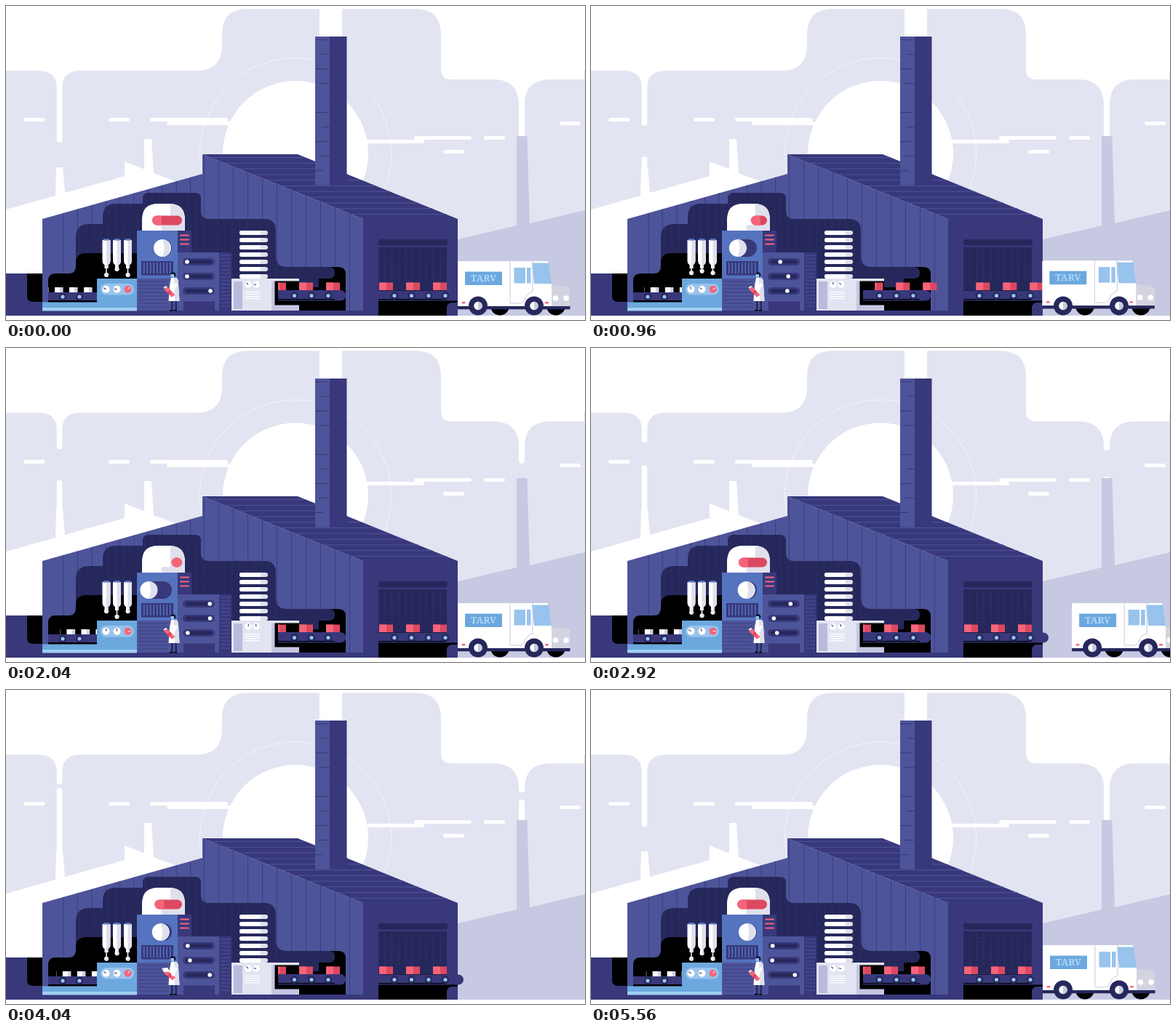
An HTML page for the animation above (5.6 s loop, 796x432 px).

```html
<!DOCTYPE html>
<html lang="en">
<head>
<meta charset="utf-8">
<title>Factory</title>
<style>
html,body{margin:0;width:100%;height:100%;overflow:hidden;background:#fff}
svg{display:block;width:796px;height:432px}
</style>
</head>
<body>
<svg id="stage" viewBox="0 0 796 432" xmlns="http://www.w3.org/2000/svg"></svg>
<script>
const LOOP = 5600;
const C = {
  sky: '#e3e4f2', haze: '#c7c9e2', wall: '#4d5499', navy: '#38387b', deep: '#26285c',
  blue: '#5573be', aqua: '#6ca8de', pale: '#98c3ec', red: '#f5647a', rose: '#dc4860', grey: '#dfe0ec'
};

const rect = (x, y, w, h, fill, r = 0, more = '') =>
  `<rect x="${x}" y="${y}" width="${w}" height="${h}" rx="${r}" fill="${fill}" ${more}/>`;
const path = (d, fill, more = '') => `<path d="${d}" fill="${fill}" ${more}/>`;
const disc = (x, y, r, fill, more = '') => `<circle cx="${x}" cy="${y}" r="${r}" fill="${fill}" ${more}/>`;
const line = (x1, y1, x2, y2, stroke, w = 1, more = '') =>
  `<line x1="${x1}" y1="${y1}" x2="${x2}" y2="${y2}" stroke="${stroke}" stroke-width="${w}" ${more}/>`;
const rep = (n, fn) => Array.from({length: n}, (_, i) => fn(i)).join('');
const group = (id, body, more = '') => `<g id="${id}" ${more}>${body}</g>`;
const clip = (id, body) => `<clipPath id="${id}">${body}</clipPath>`;

const ROOM = 'M96 352V318Q96 300 114 300H133V290Q133 272 151 272H188V265Q188 257 196 257H260Q268 257 268 265V282' +
  'Q268 293 279 293H355Q371 293 371 309V344Q371 359 386 359H444Q452 359 452 367T444 375H430V387H403V400H96Z';
const FRONT = 'M50 293L270 231V204L491 293V419H50Z';

const wheel = (x, y) => disc(x, y, 5.2, C.deep) + disc(x, y, 2.6, C.pale);
const redBox = x => rect(x, 380.5, 19, 10.5, C.rose) + rect(x, 380.5, 10, 10.5, C.red);
const whiteBox = x => rect(x, 387, 11.5, 7, '#cfd0e4') + rect(x, 387, 7, 7, '#fff');
const smoke = (id, x, w) =>
  line(x, 0, x, 0, '#fff', w, `id="${id}Top" stroke-linecap="round"`) +
  line(x, 0, x, 0, '#fff', w, `id="${id}Low" stroke-linecap="round"`);

function defs() {
  return '<defs>' +
    clip('front', path(FRONT, '#000')) +
    clip('room', path(ROOM, '#000')) +
    clip('dome', path('M187 309V294Q187 272 209 272H224Q246 272 246 294V309Z', '#000')) +
    clip('inBelt', rect(58, 380, 67, 20, '#000')) +
    clip('midBelt', rect(374, 370, 93, 30, '#000')) +
    clip('outBelt', rect(512, 370, 150, 30, '#000')) +
    clip('above', rect(0, 0, 796, 426, '#000')) +
    '</defs>';
}

function sky() {
  const dashes = [[24, 154, 29.5], [141, 154, 29], [198, 154, 107], [221, 159, 90], [561, 179, 79],
    [490, 184, 85], [657, 179, 29], [601, 198, 29], [761, 159, 29]];
  return path('M0 89H45Q70 89 70 114H77Q77 89 102 89H262Q297 89 297 54V39Q297 4 332 4H431V60H462V4H563' +
    'Q598 4 598 39V87Q598 101 612 101H670Q705 101 705 136H713Q713 101 748 101H796V330H0Z', C.sky) +
    rect(795, 89, 1, 12, C.sky) +
    disc(398, 203, 100, '#fff') +
    disc(398, 203, 131.5, 'none', 'stroke="#fff" stroke-dasharray="3 2"') +
    dashes.map(([x, y, w]) => rect(x, y, w, 5, '#fff', 2.5)).join('') +
    smoke('left', 73.5, 7.5) + smoke('right', 709, 8) +
    path('M0 280L68 261L69 222H78L81 257L163 234V214L190 224.500V183H200L203 230L232 241L240 300V368H0Z', '#fff') +
    path('M702 179H716.500L720 299L796 281V426H600V326L702 302Z', C.haze);
}

function shell() {
  const ticks = [[46, 0, 17], [66, 9, 11], [86, 0, 17], [106, 6, 14], [126, 17, 3],
    [146, 0, 17], [166, 9, 11], [186, 0, 17], [206, 5, 15], [226, 0, 12]];
  return rect(0, 368, 50, 58, C.navy) +
    path('M29 368H50V407H37Q29 407 29 399Z', '#000') +
    path(FRONT, C.wall) +
    group('seams', rep(10, i => line(79 + 19.4 * i, 200, 79 + 19.4 * i, 419, C.navy, .8)) +
      rep(11, i => line(272.5 + 20 * i, 200, 272.5 + 20 * i, 419, C.navy, .8)), 'clip-path="url(#front)"') +
    path('M270 204H401L621 293V426H491V293Z', C.navy) +
    rep(11, i => {
      const dy = 4.5 + 7.8 * i, dx = dy * 2.48;
      return line(270 + dx, 204 + dy, 401 + dx, 204 + dy, C.wall, 1);
    }) +
    rect(425, 42, 20, 204.500, C.wall) + rect(445, 42, 23.500, 204.500, C.navy) +
    ticks.map(([y, x, w]) => rect(425 + x, y, w, 1, C.navy)).join('') +
    rect(0, 419, 621, 7, C.navy);
}

function cutaway() {
  return path('M370 359H457Q467 359 467 369V419H370Z', '#000') +
    path(ROOM, C.deep) +
    group('dots', rep(28, i => line(101 + 10 * i, 255, 101 + 10 * i, 375, '#34376f', .8)),
      'clip-path="url(#room)" stroke-dasharray="3 2"') +
    path('M58 378Q58 368 68 368H86Q96 368 96 358V354Q96 340 110 340H182V419H58Z', '#000');
}

function leftMachines() {
  const tube = (x, i) =>
    group('rod' + i, line(x, 340, x, 370, '#fff', 1.5) + disc(x, 370, 3, '#fff') +
      path(`M${x} 367a3 3 0 0 1 0 6Z`, C.grey)) +
    path(`M${x - 5.5} 322h11v28q0 5-3 6v5h-5v-5q-3-1-3-6Z`, '#fff') +
    path(`M${x} 322h5.500v28q0 5-3 6v5h-2.500Z`, C.grey) +
    rect(x - 4, 320, 8, 2.5, C.blue);
  const gauge = (x, y, r, fill, id, ink) => disc(x, y, r, fill) +
    line(x, y, x, y - r + 1.2, ink, 1, `id="${id}"`);
  return group('inBoxes', '', 'clip-path="url(#inBelt)"') +
    rect(58, 394, 67, 13, C.navy) + rect(58, 405, 67, 2, '#000') +
    wheel(78, 400) + wheel(101, 400) +
    [138, 152.5, 167.5].map(tube).join('') +
    rect(50, 407.5, 130, 8, C.aqua) + rect(125, 375, 55, 41, C.aqua) +
    rect(50, 415, 130, 4.5, '#a0cff3') + rect(130, 382, 46, 15.5, C.pale, 7.7) +
    gauge(137.5, 389.7, 5, '#fff', 'g0', C.deep) +
    gauge(152.5, 389.7, 5, '#fff', 'g1', C.deep) +
    gauge(167.5, 389.7, 5, C.red, 'g2', '#fff') +
    // oven
    rect(180, 309, 56, 110, C.wall) + rect(180, 309, 56, 66, C.blue) +
    rep(8, i => line(182, 379 + 5 * i, 222, 379 + 5 * i, C.navy, .8)) +
    rect(236, 309, 19, 30, C.navy) +
    rep(3, i => rect(239, 314.5 + 6 * i, 13, 2, C.red, 1)) +
    rect(186, 351, 44, 19.500, C.navy) +
    rep(9, i => rect(189 + 4.5 * i, 353, 1.5, 15, C.blue)) +
    group('cap', rect(187, 272, 59, 37, '#fff') +
      path('M226 272H246V309H217Q213 309 213 305T217 301H226Z', C.grey), 'clip-path="url(#dome)"') +
    rect(201, 288.5, 41, 13, C.rose, 6.5, 'id="bar"') +
    path('', C.red, 'id="barTip"') +
    rect(203, 321, 25, 24, C.navy, 12, 'id="slot"') +
    group('knob', disc(0, 333, 12, '#fff') + path('M0 321a12 12 0 0 1 0 24q5-12 0-24Z', C.grey)) +
    // slider cabinet
    rect(236, 339, 57, 80, C.wall) + rect(293, 339, 17, 80, C.navy) +
    rep(15, i => line(295, 343 + 5 * i, 308, 343 + 5 * i, C.wall, 1)) +
    rect(244, 406.5, 43, 12.5, C.navy) +
    rep(3, i => rect(243, 347 + 20 * i, 44, 10, C.navy, 5) + rect(247, 349.5 + 20 * i, 36, 5, C.deep, 2.5) +
      disc(0, 352 + 20 * i, 2.8, '#fff', `id="s${i}"`)) +
    // stacked plates and packer
    rep(7, i => rect(321, 309 + 10 * i, 39, 6, C.grey, 3) + path(`M350 ${309 + 10 * i}h-26a3 3 0 0 0 0 6h26Z`, '#fff')) +
    rect(310, 375, 93, 44, '#c5c7e2') + rect(310, 375, 55, 44, C.sky) +
    rect(365, 375, 38, 3.5, C.sky) + rect(313, 379, 12, 38, '#b9bbdd') +
    rep(4, i => rect(328, 393 + 3 * i, 21, 1.2, '#fff')) +
    rect(369.5, 378.5, 33.500, 33, '#000') +
    gauge(333, 383.2, 4.6, '#fff', 'g3', C.deep) +
    gauge(344, 383.2, 4.6, '#fff', 'g4', C.deep);
}

function worker() {
  return rect(227, 404, 2.5, 15, C.deep) + rect(232.5, 404, 2.5, 15, C.deep) +
    path('M225 419.500v-1.500h4.500v1.500ZM231 419.500v-1.500h4v1.500Z', '#000') +
    path('M227 374H234Q237 375 237 382L238.500 406H223.500L225 384Z', '#fff') +
    path('M231 374H234Q237 375 237 382L238.500 406H232Z', C.grey) +
    disc(229.5, 370.5, 3.2, C.pale) +
    path('M225.500 369Q227 366 230 366Q234 367 233.500 371L231 373V369Z', '#15163a') +
    group('board', path('M-8 -1L-4 -5L8 5L4 9Z', C.red) + path('M0 -1L3.500 1.500L0 5.500L-3 3Z', C.rose) +
      path('M-7 -2L-4 -5L-6 -6L-9 -3Z', '#fff')) +
    path('M217 387.500L214 383L222 382L226 388Z', '#fff', 'id="sheet"') +
    path('M233 381L236 383L230 394L227 392Z', '#fff');
}

function belts() {
  return group('midBoxes', '', 'clip-path="url(#midBelt)"') +
    path('M374 391H460a7 7 0 0 1 0 14.500H374Z', C.navy) + rect(374, 403, 78, 1.2, '#000') +
    [396.5, 420, 443].map(x => wheel(x, 398.5)).join('') +
    // loading door
    rect(512, 321, 95, 8.5, C.deep, 3) + rect(512, 332, 94, 60, C.deep) +
    rep(9, i => line(521 + 9.5 * i, 335, 521 + 9.5 * i, 380, '#3a3c78', .8, 'stroke-dasharray="3 2"')) +
    rect(512, 391, 94, 35, '#000') + rect(606, 404, 15, 22, '#000') +
    path('M606 426V416Q606 408 614 408H621V426Z', C.navy) +
    group('outBoxes', '', 'clip-path="url(#outBelt)"') +
    path('M512 391.500H622a6.800 6.800 0 0 1 0 14H512Z', C.navy) + rect(512, 403, 94, 1.2, '#000') +
    [534, 557.5, 581, 604].map(x => wheel(x, 398.5)).join('');
}

function truck() {
  const tyre = x => disc(x, 412.5, 13, C.deep) + disc(x, 412.5, 5.7, '#fff') +
    path(`M${x} 406.800a5.700 5.700 0 0 1 0 11.400Z`, '#c9cbda');
  const body = path('M621 353Q621 351 623 351H745L750 384L775 389V414H621Z', '#fff') +
    path('M750 384L770 386Q775 387 775 392V413H750Z', '#d3d4e0') +
    path('M723 353.500H746L750 382H726Z', C.pale) +
    rect(698.5, 360, 15.5, 21.500, C.pale) + rect(716, 360, 5.5, 21.500, C.pale) +
    path('M693 351V409H707Q711 409 713 404Q716 395 724 393V351', 'none', 'stroke="#c9cbe0"') +
    rect(631, 365.5, 51, 18.500, C.aqua) +
    `<text x="656.5" y="379" text-anchor="middle" font-family="'Noto Serif',serif" font-weight="800" font-size="13" fill="#b3d8f6">TARV</text>` +
    disc(755.5, 402, 3.8, '#fff') + disc(770, 402, 3.8, '#fff') +
    rect(626.5, 407, 5, 2.4, C.red, 1.2) + rect(741, 407, 5, 2.4, C.red, 1.2) +
    rect(621, 413, 154.500, 4.3, C.deep);
  return group('truck', disc(679, 412.5, 13, '#000') + disc(756, 412.5, 13, '#000') +
    group('body', body) + tyre(649) + tyre(726), 'clip-path="url(#above)"');
}

const svg = document.getElementById('stage');
svg.innerHTML = defs() + sky() + shell() + cutaway() + leftMachines() + worker() + belts() + truck();

const parts = {};
svg.querySelectorAll('[id]').forEach(el => parts[el.id] = el);
const set = (id, attrs) => { for (const k in attrs) parts[id].setAttribute(k, attrs[k]); };
const shift = (id, x, y) => set(id, {transform: `translate(${x} ${y})`});
const turn = (id, a) => set(id, {
  transform: `rotate(${a} ${parts[id].getAttribute('x1')} ${parts[id].getAttribute('y1')})`
});
const wave = (t, period) => Math.cos(2 * Math.PI * t / period);

parts.inBoxes.innerHTML = rep(6, i => whiteBox(27 + 20 * i));
parts.midBoxes.innerHTML = rep(5, i => redBox(329 + 37 * i));
parts.outBoxes.innerHTML = rep(4, i => redBox(476 + 37 * i));

// A plume rises off its stack, then a fresh one grows up to meet it.
function plume(id, t, base, min, detach, delay, r) {
  const speed = .0235, u = (t - detach + LOOP) % LOOP;
  const end = Math.max(min, base - speed * u);
  const top = base - speed * (u - delay);
  set(id + 'Top', {y1: min - 20, y2: end - r});
  set(id + 'Low', {y1: top + r, y2: base + 4, visibility: u > delay ? 'visible' : 'hidden'});
}

function truckX(t) {
  if (t < 2360) return 0;
  if (t < 3800) return 40 * ((t - 2360) / 560) ** 2;
  return t < 4850 ? 13 * ((4850 - t) / 210) ** 2 : 0;
}

function draw(t) {
  const fast = wave(t, 800), slow = wave(t, 1400);
  plume('left', t, 222, 130, 4130, 1790, 3.75);
  plume('right', t, 179, 141, 1190, 1660, 4);

  shift('inBoxes', t / 350 % 1 * 20, 0);
  const loading = t < 2000;
  const step = loading ? t * 111 / 2000 % 37 : 0;
  shift('midBoxes', step, 0);
  shift('outBoxes', step, 0);

  [1, -1, 1].forEach((s, i) => shift('rod' + i, 0, -4 + 4 * s * fast));
  [-fast, -slow, fast].forEach((v, i) => set('s' + i, {cx: 265 + 16 * v}));

  const x = 214.5 - 13.5 * slow, tip = Math.min(x + 13, 235.5);
  set('bar', {x, width: 242 - x});
  set('barTip', {d: `M${x + 6.5} 288.5H${tip}${tip < 235.5 ? 'v13' : 'a6.5 6.5 0 0 1 0 13'}H${x + 6.5}a6.5 6.5 0 0 1 0-13Z`});
  const k = 205.5 + 9.5 * slow;
  shift('knob', k, 0);
  set('slot', {x: k - 12, width: 240 - k});

  turn('g0', -25 - 35 * slow);
  turn('g1', -45 - 40 * fast);
  turn('g2', 70 - 30 * fast);
  turn('g3', -20 - 30 * slow);
  turn('g4', -45 - 40 * fast);

  const lift = Math.max(0, 1 - Math.abs(t - 4040) / 400);
  set('board', {transform: `translate(225 ${391.5 - lift}) rotate(${6 - 6 * lift})`});
  set('sheet', {opacity: lift > .3 ? 1 : 0});

  const hop = loading ? Math.sin(Math.PI * t / 667) ** 2 : 0;
  shift('truck', truckX(t), 0);
  shift('body', -.7 * hop, -.9 * hop);
}

const start = performance.now();
function tick() {
  draw((performance.now() - start) % LOOP);
  requestAnimationFrame(tick);
}
draw(0);
requestAnimationFrame(tick);
</script>
</body>
</html>
```
